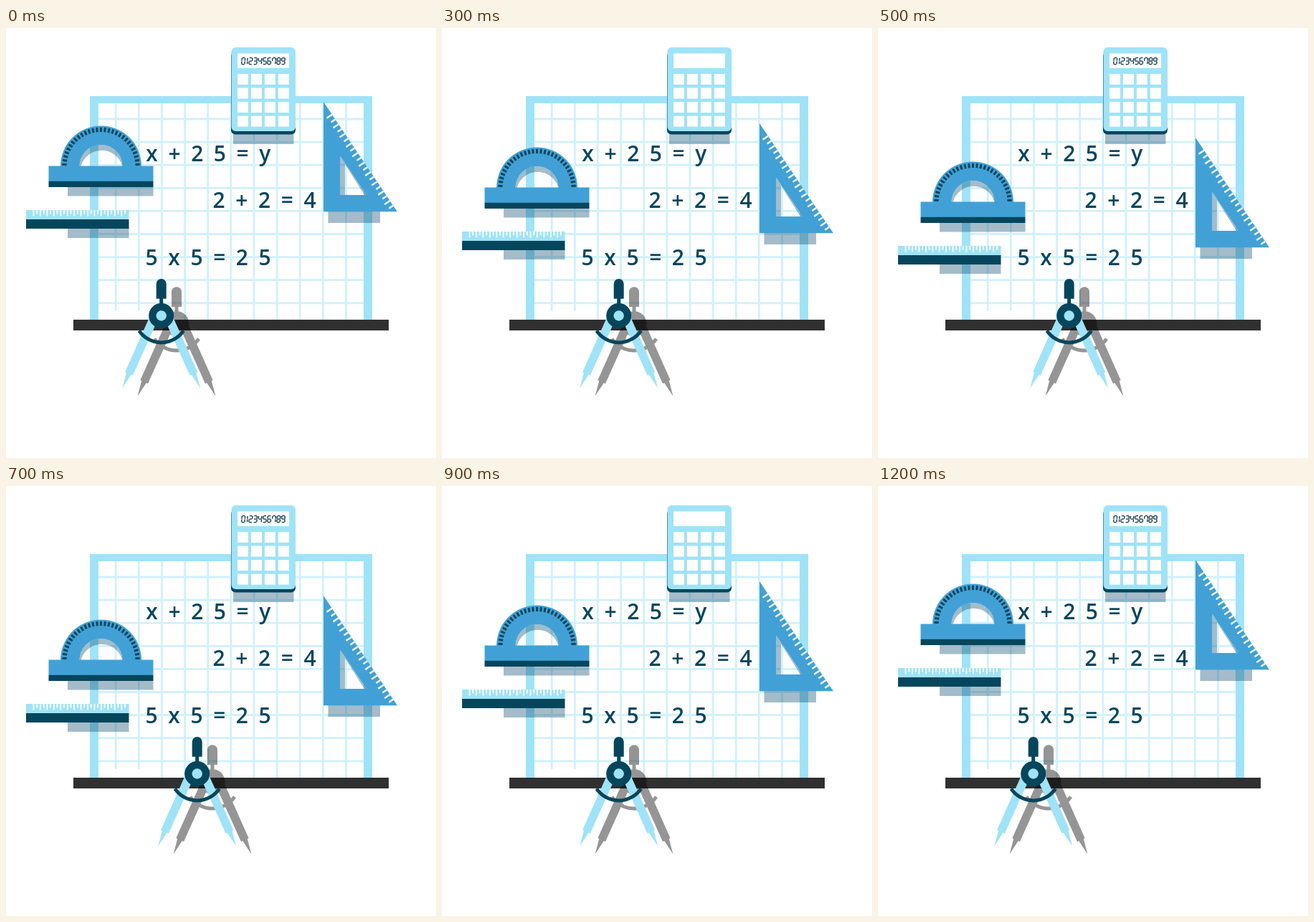
An HTML page for the animation above (1.3 s loop, 600x600 px).

```html
<!DOCTYPE html>
<html lang="en">
<head>
<meta charset="utf-8">
<title>Math tools</title>
<style>
html, body { margin: 0; width: 100%; height: 100%; overflow: hidden; background: #fff; }
svg { display: block; width: 100%; height: 100%; }
text { font: 600 30px "Open Sans", "Noto Sans", sans-serif; letter-spacing: 3.4px; fill: #05465f; }
</style>
</head>
<body>
<svg id="stage" viewBox="0 0 600 600"></svg>
<script>
const LIGHT = '#9fe3f8', BLUE = '#41a1d6', DARK = '#05465d', GRID = '#d0f1fc', BAR = '#303030';
const stage = document.getElementById('stage');

const repeat = (n, draw) => Array.from({ length: n }, (_, i) => draw(i)).join('');
const rect = (x, y, w, h, fill, extra = '') =>
  `<rect x="${x}" y="${y}" width="${w}" height="${h}" fill="${fill}" ${extra}/>`;
const path = (d, fill, extra = '') => `<path d="${d}" fill="${fill}" ${extra}/>`;
const stroke = (d, color, width) => path(d, 'none', `stroke="${color}" stroke-width="${width}"`);
const circle = (x, y, r, fill) => `<circle cx="${x}" cy="${y}" r="${r}" fill="${fill}"/>`;
const shadow = (x, y, w, h) => rect(x, y, w, h, '#04466a', 'opacity=".36"');
const shade = d => path(d, '#04466a', 'opacity=".36" fill-rule="evenodd"');

function board() {
  const columns = repeat(11, i => `M${153.2 + i * 32.13} 105V407`);
  const rows = repeat(9, i => `M129 ${127 + i * 32.1}H499`);
  return rect(117, 95, 394, 312, LIGHT) + rect(129, 105, 370, 302, '#fff') +
    stroke(columns + rows, GRID, 2.8) +
    rect(145, 395, 42, 12, '#fff') + rect(94, 407, 440, 15, BAR);
}

function equations() {
  return [[195.3, 186, 'x + 2 5 = y'], [288.6, 251, '2 + 2 = 4'], [194.6, 331, '5 x 5 = 2 5']]
    .map(([x, y, s]) => `<text x="${x}" y="${y}">${s}</text>`).join('');
}

// Seven-segment digits: a-g in a 4.4 x 9 cell.
function display() {
  const segments = {
    a: 'M.4 0H4', b: 'M4.4 .4V4.1', c: 'M4.4 4.9V8.6', d: 'M.4 9H4',
    e: 'M0 4.9V8.6', f: 'M0 .4V4.1', g: 'M.4 4.5H4'
  };
  const digits = 'abcdef bc abdeg abcdg bcfg acdfg acdefg abcf abcdefg abcdfg'.split(' ');
  const shapes = digits.map((lit, i) => {
    const x = i === 0 ? 0 : i === 1 ? 3.4 : 10.2 + (i - 2) * 6.5;
    return `<g transform="translate(${x} 0)">` +
      stroke([...lit].map(s => segments[s]).join(''), '#0b3547', 1.35) + '</g>';
  });
  return `<g id="display" transform="translate(329.3 41.6) skewX(-4)">${shapes.join('')}</g>`;
}

function calculator() {
  const keys = repeat(16, i =>
    rect(323 + (i % 4) * 18.95, 64 + Math.floor(i / 4) * 19.55, 15, 15, '#fff'));
  return shadow(317, 148, 84.5, 14) +
    rect(314, 33, 90, 115.5, DARK, 'rx="6"') + rect(314.5, 27, 89.5, 117, LIGHT, 'rx="6"') +
    rect(323, 35.5, 72, 20.5, '#fff') + display() + keys;
}

function protractor() {
  const cx = 132.5, cy = 193;
  const ticks = repeat(29, i => {
    const a = (3 + i * 174 / 28) * Math.PI / 180, c = Math.cos(a), s = Math.sin(a);
    return `M${cx + 48 * c} ${cy - 48 * s}L${cx + 54.3 * c} ${cy - 54.3 * s}`;
  });
  return shadow(86, 222, 119.5, 12.5) +
    shade('M102.5 193A30 30 0 0 1 162.5 193ZM104.5 193A30 30 0 0 1 162.4 193Z') +
    path('M76 193A56.5 56.5 0 0 1 189 193H162.5A30 30 0 0 0 102.5 193Z', BLUE) +
    rect(59.5, 192.5, 146, 21.5, BLUE) + rect(59.5, 213.8, 146, 8.2, DARK) +
    stroke(ticks, DARK, 3);
}

function ruler() {
  const ticks = repeat(28, i => `M${38.5 + i * 4.72} 254v${i % 2 ? 5.5 : 8.5}`);
  return shadow(86, 280, 85.5, 13) + rect(28, 254, 143.5, 13.5, LIGHT) +
    rect(28, 267, 143.5, 13, DARK) + stroke(ticks, '#fff', 1.8);
}

function setSquare() {
  const hole = 'M466.5 179V233H503Z';
  const ticks = repeat(20, i => {
    const s = 21.5 + i * 8.05, len = i % 2 ? 7 : 9;
    return `M${443 + s * .557} ${103 + s * .83}l${-.83 * len} ${.557 * len}`;
  });
  return shadow(449.5, 256, 72.5, 16) + shade(hole + 'M473 190V233H500Z') +
    path('M443 103V256.3H546Z' + hole, BLUE, 'fill-rule="evenodd"') + stroke(ticks, '#fff', 2.4);
}

// Drawn around the hub center.
function compass(dark, light) {
  const leg = side => `<g transform="scale(${side} 1)">` +
    path('M3.5 2.5L14.5 -2.5L50.6 78.5L48.8 79.5L54.4 101L42.2 82.5L40 83.5Z', light) + '</g>';
  return path('M-7 -23.7V-44.5A7 7 0 0 1 7 -44.5V-23.7Z', dark) + rect(-2.5, -25, 5, 12, dark) +
    leg(-1) + leg(1) +
    stroke('M-31 20.9A37.4 37.4 0 0 0 31 20.9', dark, 5) +
    circle(0, 0, 17.5, dark) + circle(0, 0, 7.2, light);
}

stage.innerHTML = board() + equations() + calculator() +
  `<g id="sinking">${protractor()}${ruler()}${setSquare()}</g>
  <g id="sliding">
    <g transform="translate(238 412.7)" opacity=".41">${compass('#000', '#000')}</g>
    <g transform="translate(216.7 401.5)">${compass(DARK, LIGHT)}</g>
  </g>`;

const [sinking, sliding, digits] = ['sinking', 'sliding', 'display'].map(id => document.getElementById(id));

function render(ms) {
  const step = Math.floor((ms % 1300) / 100);
  const shift = 60 - 10 * Math.abs(step - 6);
  sinking.setAttribute('transform', `translate(0 ${shift})`);
  sliding.setAttribute('transform', `translate(${shift} 0)`);
  digits.setAttribute('visibility', shift === 30 ? 'hidden' : 'visible');
}

const start = performance.now();
function tick() {
  render(performance.now() - start);
  requestAnimationFrame(tick);
}
tick();
</script>
</body>
</html>
```
